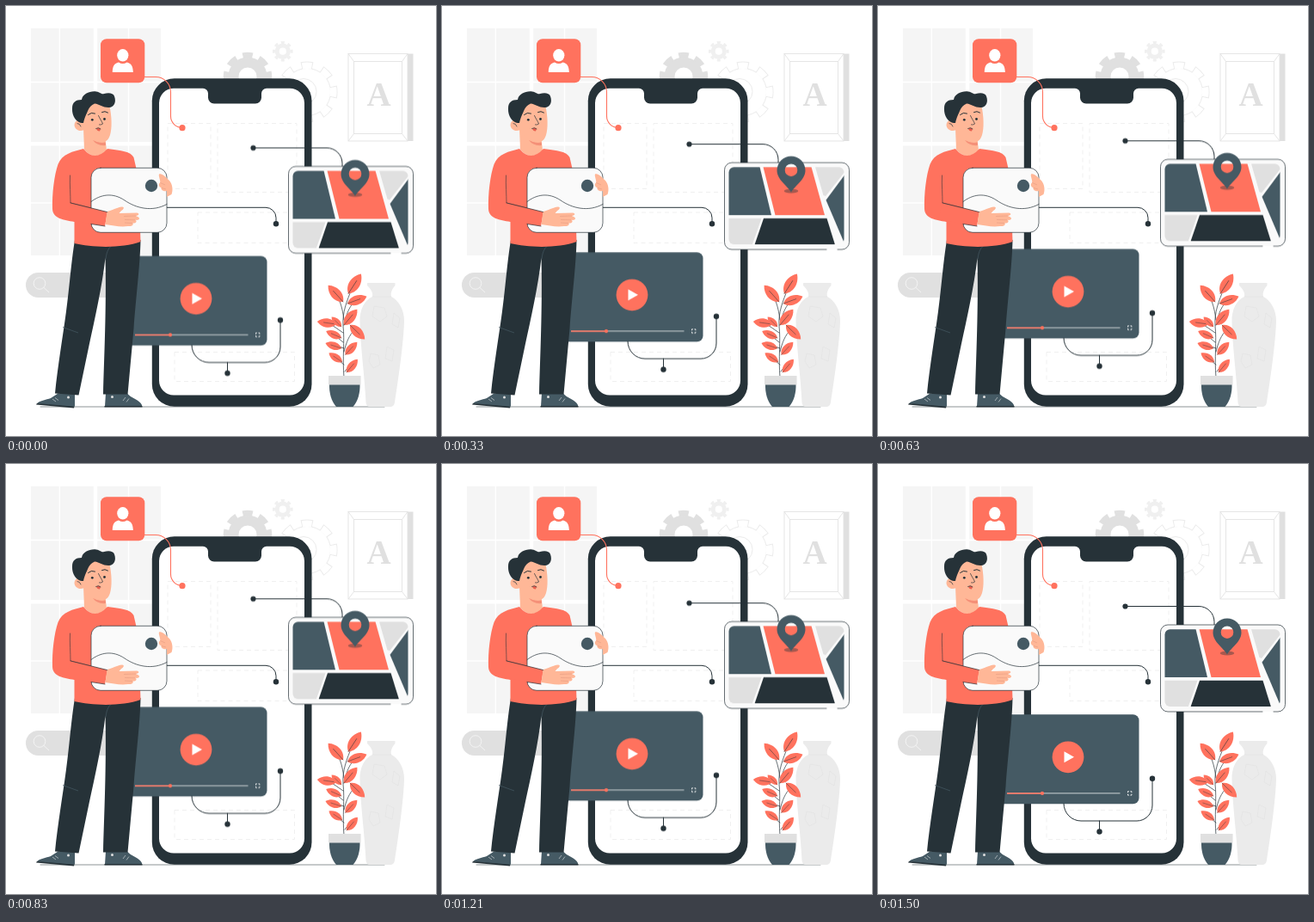
Write an HTML page that moves like this. It is 500 px wide and 500 px high and loops after 1540 ms.

```html
<!DOCTYPE html>
<html lang="en">
<head>
<meta charset="utf-8">
<title>Phone and floating cards</title>
<style>
  html, body { margin: 0; width: 100%; height: 100%; overflow: hidden; background: #fff; }
  svg { display: block; width: 100%; height: 100%; }
  .coral { fill: #ff725e; }
  .dark { fill: #263238; }
  .slate { fill: #455a64; }
  .skin { fill: #ffb797; }
  .pale { fill: #e0e0e0; }
  .white { fill: #fff; }
  .line { fill: none; stroke: #263238; stroke-width: 1; stroke-linecap: round; stroke-linejoin: round; }
  .thin { stroke-width: .7; }
  .crease { fill: none; stroke: #e99f84; stroke-width: .7; }
  .faint { fill: none; stroke: #e3e3e3; stroke-width: .9; }
  .dash { fill: none; stroke: #ececec; stroke-width: .8; stroke-dasharray: 5 4; }
  .float { animation: float 1540ms linear -40ms infinite; }
  @keyframes float { 50% { transform: translateY(-10px); } }
</style>
</head>
<body>
<svg viewBox="0 0 500 500">
  <defs>
    <g id="leaf">
      <path class="coral" d="M0 0C-8 -6 -8 -18 0 -26C8 -18 8 -6 0 0Z"/>
      <path class="line" stroke-width=".5" d="M0 0V-17" style="stroke-width:.5"/>
    </g>
    <clipPath id="mapArea"><rect x="333.5" y="192.3" width="134" height="89.7" rx="6"/></clipPath>
  </defs>

  <!-- window -->
  <rect x="29" y="26" width="151" height="264" fill="#f5f5f5"/>
  <g fill="none" stroke="#fff">
    <path stroke-width="1.4" d="M62.3 26V290M142.5 26V290M29 88.5H180M29 229H180"/>
    <path stroke-width="4.5" d="M104 26V290M29 160.2H180"/>
  </g>

  <!-- search bar -->
  <rect class="pale" x="23" y="310" width="115" height="29" rx="14.5"/>
  <g fill="none" stroke="#f5f5f5" stroke-width=".9">
    <circle cx="39" cy="322.5" r="6.8"/>
    <path d="M44 327.5l6 5.5"/>
  </g>

  <!-- gears -->
  <g fill="none" stroke="#e0e0e0">
    <circle cx="281" cy="82" r="16.5" stroke-width="12"/>
    <circle cx="281" cy="82" r="25" stroke-width="6.5" pathLength="80" stroke-dasharray="6 4" stroke-dashoffset="3"/>
  </g>
  <g fill="none" stroke="#f0f0f0">
    <circle cx="321.8" cy="52.7" r="6.6" stroke-width="5"/>
    <circle cx="321.8" cy="52.7" r="10.2" stroke-width="3.2" pathLength="80" stroke-dasharray="5 5" stroke-dashoffset="2.5"/>
  </g>
  <g fill="none">
    <circle cx="350" cy="100" r="31" stroke="#ebebeb" stroke-width="9" pathLength="80" stroke-dasharray="5.4 4.6" stroke-dashoffset="2.7"/>
    <circle cx="350" cy="100" r="27.5" fill="#fff" stroke="#ebebeb"/>
    <circle cx="350" cy="100" r="30.7" stroke="#fff" stroke-width="7.8" pathLength="80" stroke-dasharray="4.6 5.4" stroke-dashoffset="2.3"/>
    <circle cx="346" cy="99.5" r="15" stroke="#ebebeb"/>
  </g>

  <!-- picture frame -->
  <path d="M467 55.5h6.5v101.5H467z" fill="#e0e0e0"/>
  <g class="faint">
    <rect x="398" y="55.5" width="69" height="101.5" fill="#fff"/>
    <rect x="404.5" y="64.5" width="56" height="84"/>
    <path d="M398 55.5l6.5 9M467 55.5l-6.5 9M398 157l6.5 -8.5M467 157l-6.5 -8.5"/>
  </g>
  <text x="433.5" y="115.5" text-anchor="middle" font-family="'Liberation Serif', serif" font-weight="bold" font-size="39" fill="#e0e0e0">A</text>

  <!-- floor and vase -->
  <path class="line thin" d="M40 466H440" stroke-opacity=".75"/>
  <path d="M420 322H452.5V325C449 329 447 333 448 338C456 342 463.5 353 463 367C462 395 456 435 452 461Q451 466 447 466H423Q419 466 418.500 461C417 430 412 395 411.500 367C411 353 417 342 426 338C427 333 424 329 420 325Z" fill="#ebebeb"/>
  <path fill="none" stroke="#e2e2e2" stroke-width=".7" d="M426 338H448M428 349l12 2 3 10-8 6-9-6zM451 357l7 6-2 11-7-4zM424 404l9 2 2 11-8 4-5-8zM443 396l8 4-2 13-8-3z"/>

  <!-- plant -->
  <path class="line thin" d="M393 432C391 408 394 390 392 372C391 356 396 344 402 329M393 365C391 350 389 346 386 338M392 380L379 371M393 371C397 352 402 346 408 342M393 398L379 393M393 402C396 390 399 383 405 377M393 417L383 409M394 425L400 417M392 391L380 381"/>
  <use href="#leaf" transform="translate(398 334.500) rotate(33) scale(1.050)"/>
  <use href="#leaf" transform="translate(392 344) rotate(-42)"/>
  <use href="#leaf" transform="translate(397 346) rotate(70) scale(.92)"/>
  <use href="#leaf" transform="translate(384 370) rotate(-82) scale(.86)"/>
  <use href="#leaf" transform="translate(390 373) rotate(-45) scale(.62)"/>
  <use href="#leaf" transform="translate(393 371) rotate(40) scale(.92)"/>
  <use href="#leaf" transform="translate(390 386) rotate(-66) scale(.75)"/>
  <use href="#leaf" transform="translate(400 371) rotate(134) scale(.92)"/>
  <use href="#leaf" transform="translate(390 398) rotate(-72) scale(.75)"/>
  <use href="#leaf" transform="translate(394.500 405.500) rotate(43) scale(.78)"/>
  <use href="#leaf" transform="translate(391 414) rotate(-56) scale(.72)"/>
  <use href="#leaf" transform="translate(396 426) rotate(40) scale(.77)"/>
  <path class="slate" d="M376 439H411.5C412 450 409 460 403.5 466H384C378.5 460 375.5 450 376 439Z"/>
  <rect class="pale" x="375" y="430" width="37.5" height="10.5"/>

  <!-- phone -->
  <rect class="dark" x="169.8" y="84.300" width="185.700" height="381.500" rx="26"/>
  <path class="white" d="M195 95.800H229A6 6 0 0 1 235 101.800V106.500A7 7 0 0 0 242 113.500H290A7 7 0 0 0 297 106.500V101.800A6 6 0 0 1 303 95.800H330A17 17 0 0 1 347 112.800V435.500A17 17 0 0 1 330 452.500H195A17 17 0 0 1 178 435.500V112.800A17 17 0 0 1 195 95.800Z"/>
  <g class="dash">
    <rect x="188" y="136.500" width="50" height="76"/>
    <rect x="246" y="136.500" width="92" height="80"/>
    <rect x="223" y="240" width="106" height="35.500"/>
    <rect x="196" y="402.500" width="139.500" height="34"/>
  </g>

  <!-- contact tile -->
  <rect class="coral" x="110" y="38.300" width="51.300" height="51" rx="7"/>
  <ellipse class="white" cx="135.800" cy="57.300" rx="6.600" ry="7.200"/>
  <path class="white" d="M123.800 77C123.800 69.500 126.500 66.500 131 65.500Q135.800 68.500 140.500 65.500C145 66.500 147.800 69.500 147.800 77Z"/>
  <path d="M161 82.500H174A17.500 17.500 0 0 1 191.500 100V128A13.500 13.500 0 0 0 205 141.500" fill="none" stroke="#ff725e" stroke-width="1.100"/>
  <circle class="coral" cx="205" cy="141.700" r="3.600"/>

  <path class="line" d="M187 234.300H302A12 12 0 0 1 314 246.300V253"/>
  <circle class="dark" cx="314" cy="253.200" r="3.200"/>

  <g class="float">
    <!-- video card -->
    <rect class="slate" x="138" y="291.300" width="165.500" height="103.900" rx="7"/>
    <circle class="coral" cx="221" cy="340.800" r="18.400"/>
    <path class="white" d="M216.500 334.300V347.300L228 340.800Z"/>
    <path d="M150 382.900H281.500" stroke="#dfe3e5" stroke-width=".9"/>
    <path d="M150 382.900H191" stroke="#ff725e" stroke-width="1.500"/>
    <circle class="coral" cx="191" cy="382.900" r="2.100"/>
    <rect x="290.500" y="380.700" width="4.400" height="4.400" fill="none" stroke="#fff" stroke-width=".9" stroke-dasharray="1.400 1.600 1.400 0"/>
    <path class="line" d="M216 395A20 20 0 0 0 236 415H301A18 18 0 0 0 319 397V366M257.500 415V427"/>
    <circle class="dark" cx="319" cy="365.700" r="3.200"/>
    <circle class="dark" cx="257.500" cy="427.500" r="3.200"/>

    <!-- map card -->
    <path class="line" d="M287.500 165.500H373A18 18 0 0 1 391 183.500V187"/>
    <circle class="dark" cx="287.500" cy="165.500" r="3.100"/>
    <rect x="328.500" y="187" width="145" height="101" rx="8.500" fill="#fafafa"/>
    <path class="line thin" d="M460 288H465A8.500 8.500 0 0 0 473.500 279.500V195.500A8.500 8.500 0 0 0 465 187H337A8.500 8.500 0 0 0 328.500 195.500V279.500A8.500 8.500 0 0 0 337 288H447"/>
    <g clip-path="url(#mapArea)">
      <path class="slate" d="M333 192H369.500L383 248H333Z"/>
      <path class="coral" d="M373.500 192H429.500L445 248H387.500Z"/>
      <path class="pale" d="M434 192H468V198L446 226L443.500 225Z"/>
      <path class="slate" d="M468 201.500V281L446.500 230.500Z"/>
      <path class="pale" d="M333 251.800H371.500L360.500 283H333Z"/>
      <path class="dark" d="M374 251.800H447.500L457 282.500H363.500Z"/>
    </g>
    <ellipse cx="406" cy="220" rx="8.200" ry="2.500" fill="#263238" opacity=".4"/>
    <path class="slate" fill-rule="evenodd" d="M406 221.500C402 214 389.500 207 389.500 196A16.500 16.500 0 0 1 422.500 196C422.500 207 410 214 406 221.500ZM398.700 195.700a7.300 7.300 0 0 0 14.600 0a7.300 7.300 0 0 0 -14.600 0Z"/>
  </g>

  <!-- shoes -->
  <g class="slate">
    <path d="M60.500 450.500H80V465.500L77 466.500L36 462.500C38 459 47 458 52 456Z"/>
    <path d="M116 450H140.500C145 456 156 458 158 464V465.500H115Z"/>
  </g>
  <path class="dark" d="M36 462L79.500 465.800L79 467.500L35 463.500ZM114.500 465H158.500V466.500H114.500Z"/>
  <path d="M54 457l4 3M57 455.500l4 3M139 455l-3 4M143 456.500l-3 4" stroke="#fff" stroke-width=".7" opacity=".7"/>
  <circle cx="72.500" cy="455" r="1.500" fill="#e0e0e0"/>
  <circle cx="123.500" cy="454.500" r="1.500" fill="#e0e0e0"/>

  <!-- trousers -->
  <path class="dark" d="M80 272H156.500C156 300 151 340 148.500 375L141.500 451.500H113C114 410 117 350 115.500 293C112 325 103 365 96.500 395L84.500 452.500L57 450.500C60 420 66 385 70 355C74 325 75.500 300 80 272Z"/>
  <path d="M66 373.500L84 380M116 294C117 285 120 280 124 278" fill="none" stroke="#455a64" stroke-width=".7"/>

  <!-- head -->
  <path class="skin" d="M90 142L91 167Q103 181 117 168L115.500 155Z"/>
  <path d="M101 156Q108 160 115.800 158.500L116 162Q106 163 101 156Z" fill="#f59078"/>
  <path class="skin" d="M88 117C98 108 117 109 120.500 117C123 128 123.500 142 121 150C118.500 158.500 112 160 106 157.500C99 155 94 150 91 144C85 147 79.500 143 79.500 138C80 133 85 131 88 135Z"/>
  <path class="dark" d="M87.500 136C81 134.500 76.500 127 77 119C77 112 81 109 88 109C89 102 98 98.500 105 99.500C110 100.500 111 103 114 102C119 100.500 125 101 126 105C128 110 127 117 120 118C113 118.500 109 114 103 113.500C99 115 97 118 95.500 121C93.500 126 91.500 129 90 136Z"/>
  <circle class="dark" cx="100.300" cy="132.300" r="1.400"/>
  <circle class="dark" cx="114.500" cy="131.500" r="1.400"/>
  <path class="line" d="M95.500 126.500Q99 123 103.500 125M111.500 123.500Q115 121.500 118.500 124"/>
  <path class="line thin" d="M107.500 127.500C109 131 111.500 134 112.500 137Q111 138.500 108.500 138M83 136.500Q85.500 136 87 140"/>
  <path d="M105 143Q107.500 140.500 110 143L109 145.500Q106.500 146 105 143Z" fill="#e8604f"/>
  <path class="line thin" d="M104.500 142.500Q107.500 140.500 110 142.800"/>

  <!-- sweater -->
  <path class="coral" d="M90 166Q103 182 118 166C134 168 145 169 148.500 176L154 200L156.500 274C135 282 100 281 79.500 276L79.500 251C67 249 54.500 247 54 236C53.500 218 56 197 60.500 184C65 172 78 169 90 166Z"/>
  <path class="line thin" d="M74.500 197C74 208 75 219 75 229L117 239.500" stroke-opacity=".8"/>

  <!-- held card -->
  <rect class="line thin" x="99" y="188.300" width="88" height="75" rx="11" style="fill:#fafafa"/>
  <path class="line thin" d="M99 227.500C110 219 124 216.500 138 226C151 235 170 240 187 230.500"/>
  <circle class="slate" cx="169" cy="209" r="7.200"/>
  <path class="skin" d="M178 195.500C181 194 186 199 190 203C193.500 207 194.500 214 192.500 219L187 222V215C183.500 216 180 214 180.500 211.500C177.500 210 177 207 179 205.500C180 203 177 198 178 195.500Z"/>
  <path class="crease" d="M179.500 205.500L185 208M181 211.500L186 213"/>

  <!-- forearm and hand -->
  <path class="coral" d="M75 229L118 239.500L115 256L99 253.500L70 248Z"/>
  <path class="skin" d="M117.500 239C123 238 129 234 135 233.500C138 233.500 137 236.500 134 238L131.500 241L152 240.500C155.500 241 155 243.500 151 244L154 245.500C156.500 247.500 154 249.500 150.500 248.800C153 250.500 151 253 147.500 252.500C148.500 255 146 256.500 142 256C133 257.500 124 255 115.500 254Z"/>
  <path class="crease" d="M137 244.500L151 244M138 248.500L150 248.800M138 252L147 252.500"/>
  <path class="line thin" d="M75 229L117.500 239.500M99 253.500L115 256"/>
</svg>
</body>
</html>
```
